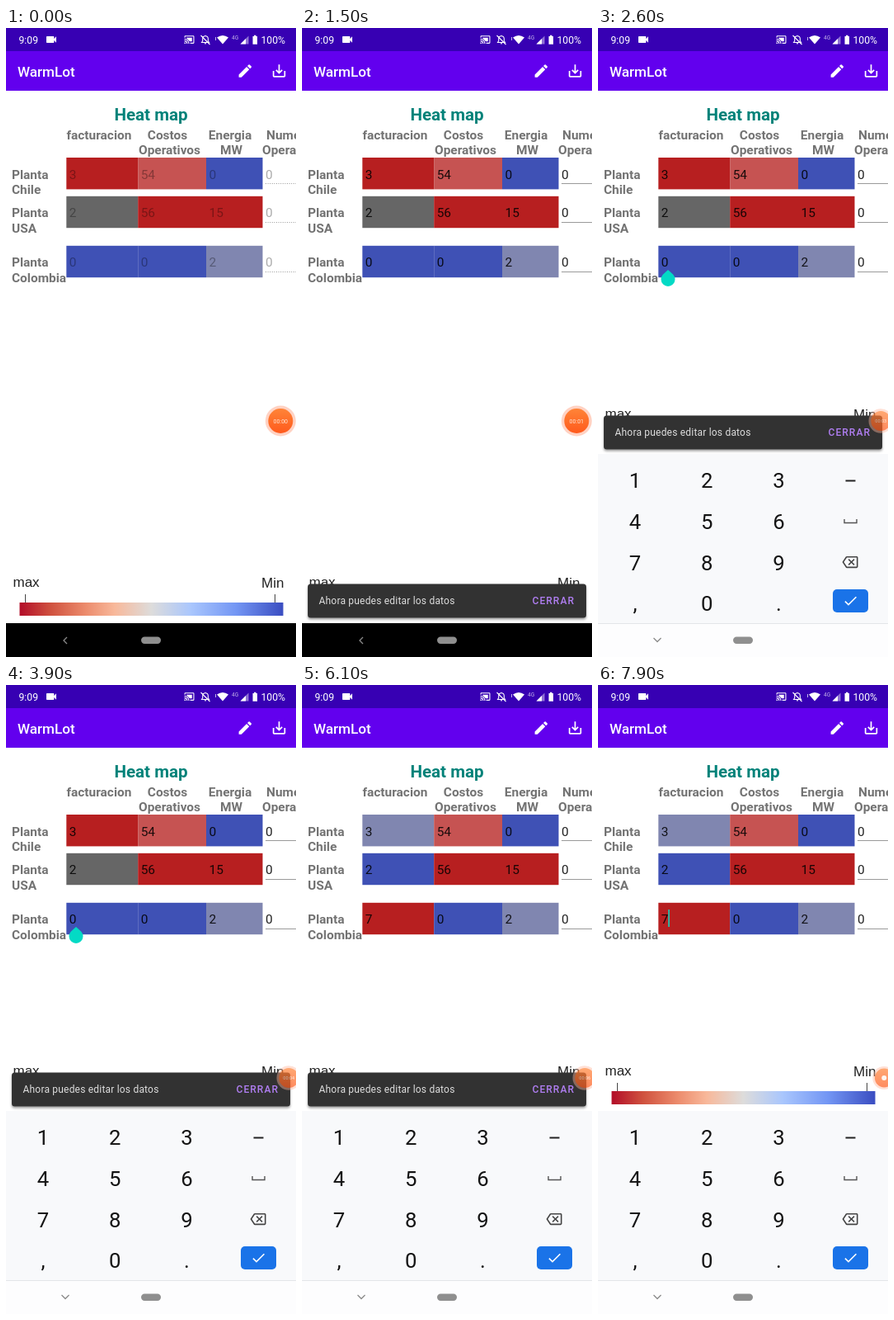
An HTML page for the animation above (8 s loop, 352 px wide and 762 px high).

```html
<!DOCTYPE html>
<html lang="es">
<head>
<meta charset="utf-8">
<title>WarmLot</title>
<style>
html, body { margin: 0; width: 100%; height: 100%; overflow: hidden; background: #fff; }
svg { display: block; width: 352px; height: 762px; font: 15.43px Roboto, sans-serif; }
.bold { font-weight: 700; fill: #737373; }
.mid { text-anchor: middle; }
.medium { font-weight: 500; }
.line { fill: none; stroke: #9a9a9a; }
</style>
</head>
<body>
<svg viewBox="0 0 352 762">
  <defs>
    <linearGradient id="scale">
      <stop offset="0" stop-color="#b20d28"/>
      <stop offset=".12" stop-color="#d0523f"/>
      <stop offset=".25" stop-color="#ec8b6c"/>
      <stop offset=".36" stop-color="#f8b89a"/>
      <stop offset=".5" stop-color="#dddcdb"/>
      <stop offset=".65" stop-color="#a9c6fd"/>
      <stop offset=".82" stop-color="#7396f4"/>
      <stop offset="1" stop-color="#3a4dc1"/>
    </linearGradient>
    <linearGradient id="orange" x2="0" y2="1">
      <stop offset="0" stop-color="#ff8438"/>
      <stop offset="1" stop-color="#ff5a1c"/>
    </linearGradient>
    <filter id="shadow" x="-5%" y="-20%" width="110%" height="150%">
      <feDropShadow dx="0" dy="2" stdDeviation="1.6" flood-opacity=".4"/>
    </filter>
  </defs>
  <rect width="352" height="762" fill="#fff"/>

  <text class="mid" x="176" y="112" font-size="20.57" font-weight="700" fill="#018279">Heat map</text>
  <g class="bold">
    <text x="73.5" y="134.5">facturacion</text>
    <g class="mid">
      <text x="196" y="134.5">Costos</text><text x="198.5" y="153">Operativos</text>
      <text x="272" y="134.5">Energia</text><text x="273.5" y="153">MW</text>
    </g>
    <text x="316" y="134.5">Numero</text><text x="311" y="153">Operarios</text>
  </g>
  <g id="rows"></g>
  <g id="caret">
    <rect x="-.8" y="272" width="1.7" height="21" fill="#1fc8b5"/>
  </g>
  <path id="handle" d="M85 293L91.3 298.7A8.5 8.5 0 1 1 78.7 298.7Z" fill="#03dac5"/>

  <g id="legend" font-family="Liberation Sans, Arial, sans-serif" font-size="17" fill="#222">
    <text x="8.5" y="676.5">max</text>
    <text x="310" y="678">Min</text>
    <path d="M23.5 686v10M326.5 686v10" stroke="#444"/>
    <rect x="16.5" y="696" width="320" height="16" fill="url(#scale)"/>
  </g>

  <g id="snack">
    <rect x="7" y="673.5" width="338" height="41" rx="3.5" fill="#323232" filter="url(#shadow)"/>
    <text x="20.5" y="698" font-size="12" letter-spacing=".2" fill="#dedede">Ahora puedes editar los datos</text>
    <text class="medium" x="279.5" y="698" font-size="12" letter-spacing="1.07" fill="#b07ef2">CERRAR</text>
  </g>

  <g id="keyboard">
    <rect y="516" width="352" height="206" fill="#f8f9fb"/>
    <rect id="press" y="622" width="87" height="49" fill="#dedfe0"/>
    <g id="keys" class="mid" font-size="25.7" fill="#141414"></g>
    <path d="M300.5 548.5h12" stroke="#222" stroke-width="2"/>
    <path d="M299 595v4.5h15v-4.5" fill="none" stroke="#555" stroke-width="1.4"/>
    <rect x="285" y="680" width="43" height="28" rx="5" fill="#1a73e8"/>
    <g id="keyIcons"></g>
  </g>

  <rect id="nav" y="721" width="352" height="41"/>
  <path id="navLine" d="M0 721.5h352" stroke="#e3e5e9"/>
  <path id="back" fill="none" stroke="#8a8a8a" stroke-width="1.3"/>
  <rect x="164" y="737.5" width="24" height="8.5" rx="4.2" fill="#8f8f8f"/>

  <rect width="352" height="76" fill="#6200ee"/>
  <rect width="352" height="28" fill="#3700b3"/>
  <g fill="#fff">
    <text class="medium" x="14" y="59" font-size="17.14">WarmLot</text>
    <text x="15.5" y="19" font-size="12.2">9:09</text>
    <text x="309.5" y="19" font-size="12.2">100%</text>
    <text x="274" y="13.5" font-size="6.5" opacity=".7">4G</text>
    <path d="M256 11.5Q263 6.5 270 11.5L263 19.5Z"/>
    <path d="M254.5 11v4" stroke="#fff" opacity=".7"/>
    <path d="M294.5 9.5v10h-10z" opacity=".45"/>
    <path d="M291 13v6.5h-6.5z"/>
    <path d="M299.5 10h1.5v-1.2h2.5V10h1.5v9.8h-5.5z"/>
    <g fill="none" stroke="#fff" stroke-width="1.1">
      <path d="M237.5 17.5h9l-1.2-1.8V13a3.3 3.3 0 0 0-6.6 0v2.7zM236.5 9l11 11M242 9.7V8.8"/>
    </g>
    <path d="M240.8 18.3h2.4a1.2 1.2 0 0 1-2.4 0z"/>
    <g id="icons"></g>
  </g>

  <g id="bubble">
    <circle r="18.5" fill="#ffb59c" opacity=".6"/>
    <circle r="15" fill="url(#orange)"/>
    <text id="timer" class="mid" y="2.5" font-size="7" fill="#ffe9dc"></text>
    <circle id="dot" r="4" fill="#fff3ea"/>
  </g>
</svg>
<script>
const LOOP = 8000, STEP = 100;
const ENABLE = 800, SNACK_IN = 900, TAP = 2100, KEYS_UP = 2300, ERASE = 4000,
      PRESS = 4600, TYPE = 4900, SNACK_OUT = 6200;
const RED = '#b71f20', PINK = '#c65352', BLUE = '#3f51b5', GREY = '#666', MIXED = '#8086b0';

const $ = id => document.getElementById(id);
const set = (id, name, value) => $(id).setAttribute(name, value);
const show = (id, on) => set(id, 'visibility', on ? 'visible' : 'hidden');
const shift = (id, x, y, k = 1) => set(id, 'transform', `translate(${x} ${y}) scale(${k})`);
const ramp = (t, start, length) => {
  const p = Math.min(1, Math.max(0, (t - start) / length));
  return p * p * (3 - 2 * p);
};

// Icons live on a 24-unit grid and are placed by their centre.
const icon = (x, y, size, d, fill = '#fff') =>
  `<path transform="translate(${x - size / 2} ${y - size / 2}) scale(${size / 24})" fill="${fill}" d="${d}"/>`;

$('icons').innerHTML =
  icon(55, 14, 16, 'M17 10.5V7c0-.55-.45-1-1-1H4c-.55 0-1 .45-1 1v10c0 .55.45 1 1 1h12c.55 0 1-.45 1-1v-3.5l4 4v-11l-4 4z') +
  icon(222.5, 14, 13, 'M1 18v3h3c0-1.66-1.34-3-3-3zm0-4v2c2.76 0 5 2.24 5 5h2c0-3.87-3.13-7-7-7zm0-4v2a9 9 0 0 1 9 9h2c0-6.08-4.93-11-11-11zm20-7H3c-1.1 0-2 .9-2 2v3h2V5h18v14h-7v2h7c1.1 0 2-.9 2-2V5c0-1.1-.9-2-2-2zM6 8h12v8h-5L6 9z') +
  icon(290.3, 52, 20.57, 'M3 17.25V21h3.75L17.81 9.94l-3.75-3.75L3 17.25zM20.71 7.04a1 1 0 0 0 0-1.41l-2.34-2.34a1 1 0 0 0-1.41 0l-1.83 1.83 3.75 3.75 1.83-1.83z') +
  icon(331.5, 52, 20.57, 'M19 12v7H5v-7H3v7c0 1.1.9 2 2 2h14c1.1 0 2-.9 2-2v-7h-2zm-6 .67l2.59-2.58L17 11.5l-5 5-5-5 1.41-1.41L11 12.67V3h2z');
$('keyIcons').innerHTML =
  icon(306, 647, 19, 'M22 3H7c-.69 0-1.23.35-1.59.88L0 12l5.41 8.11c.36.53.9.89 1.59.89h15c1.1 0 2-.9 2-2V5c0-1.1-.9-2-2-2zm0 16H7.07L2.4 12l4.66-7H22v14zm-11.59-2L14 13.41 17.59 17 19 15.59 15.41 12 19 8.41 17.59 7 14 10.59 10.41 7 9 8.41 12.59 12 9 15.59z', '#444') +
  icon(306.5, 694, 20, 'M9 16.2L4.8 12l-1.4 1.4L9 19 21 7l-1.4-1.4L9 16.2z');
$('keys').innerHTML = [...'123456789,0.'].map((key, i) =>
  `<text x="${45 + i % 3 * 87.2}" y="${557.3 + Math.floor(i / 3) * 49.6}">${key}</text>`).join('');

const rows = [
  { y: 157, place: 'Chile', values: [3, 54, 0], before: RED, after: MIXED, fills: [PINK, BLUE] },
  { y: 203.8, place: 'USA', values: [2, 56, 15], before: GREY, after: BLUE, fills: [RED, RED] },
  { y: 263.8, place: 'Colombia', values: [0, 0, 2], before: BLUE, after: RED, fills: [BLUE, MIXED] },
];
const edges = [73.3, 160.2, 243, 311.5];

function drawRows(t) {
  const enabled = t >= ENABLE, typed = t >= TYPE;
  $('rows').innerHTML = rows.map(({ y, place, values, before, after, fills }, r) => {
    const colors = [typed ? after : before, ...fills];
    const texts = [...values, 0];
    if (r === 2 && t >= ERASE) texts[0] = typed ? 7 : '';
    return `<g class="bold"><text x="7" y="${y + 25.5}">Planta</text><text x="7" y="${y + 43.8}">${place}</text></g>` +
      colors.map((c, i) =>
        `<rect x="${edges[i]}" y="${y}" width="${edges[i + 1] - edges[i]}" height="38.4" fill="${c}"/>`).join('') +
      texts.map((v, i) =>
        `<text x="${edges[i] + 3.5}" y="${y + 25.6}" fill-opacity="${enabled ? .87 : .33}">${v}</text>`).join('') +
      `<path class="line" d="M315 ${Math.round(y) + 31.5}h37" ${enabled ? '' : 'stroke-dasharray="1 1.6"'}/>`;
  }).join('');
}

function drawCaret(t) {
  const start = t < ERASE ? TAP : t < TYPE ? ERASE : 4450;
  show('caret', t >= TAP && (t - start) % 1000 < 500);
  shift('caret', t >= ERASE && t < TYPE ? 77.5 : 86, 0);
  show('handle', t >= TAP && t < ERASE);
}

function drawKeyboard(t) {
  const up = t > KEYS_UP, erasing = t >= ERASE && t < ERASE + 200;
  shift('keyboard', 0, 206 * (1 - ramp(t, KEYS_UP, 300)));
  show('keyboard', up);
  show('press', erasing || t >= PRESS && t < TYPE);
  set('press', 'x', erasing ? 263 : 2);
  set('nav', 'fill', up ? '#fdfdfe' : '#000');
  show('navLine', up);
  set('back', 'd', up ? 'M67.5 739l4.5 4.5 4.5-4.5' : 'M74 738l-4 4 4 4');
}

function drawBubble(t) {
  const dim = ramp(t, 1600, 300), tuck = ramp(t, 6800, 300);
  shift('bubble', 333.3 + 10 * dim + 4 * tuck, 476, 1 - .2 * dim - .04 * tuck);
  set('bubble', 'opacity', 1 - .3 * dim);
  $('timer').textContent = '00:0' + Math.floor((t + 450) / 1000);
  show('timer', tuck < .5);
  show('dot', tuck >= .5);
}

function draw(now) {
  const t = Math.floor(now % LOOP / STEP) * STEP;
  const lift = t >= KEYS_UP + 200 ? -204 : 0;
  drawRows(t);
  drawCaret(t);
  drawKeyboard(t);
  drawBubble(t);
  shift('legend', 0, lift);
  shift('snack', 0, lift + 52 * (1 - ramp(t, SNACK_IN, 250) + ramp(t, SNACK_OUT, 250)));
  show('snack', t > SNACK_IN && t < SNACK_OUT + 250);
}

let origin;
function tick(now) {
  origin ??= now;
  draw(now - origin);
  requestAnimationFrame(tick);
}
draw(0);
requestAnimationFrame(tick);
</script>
</body>
</html>
```
